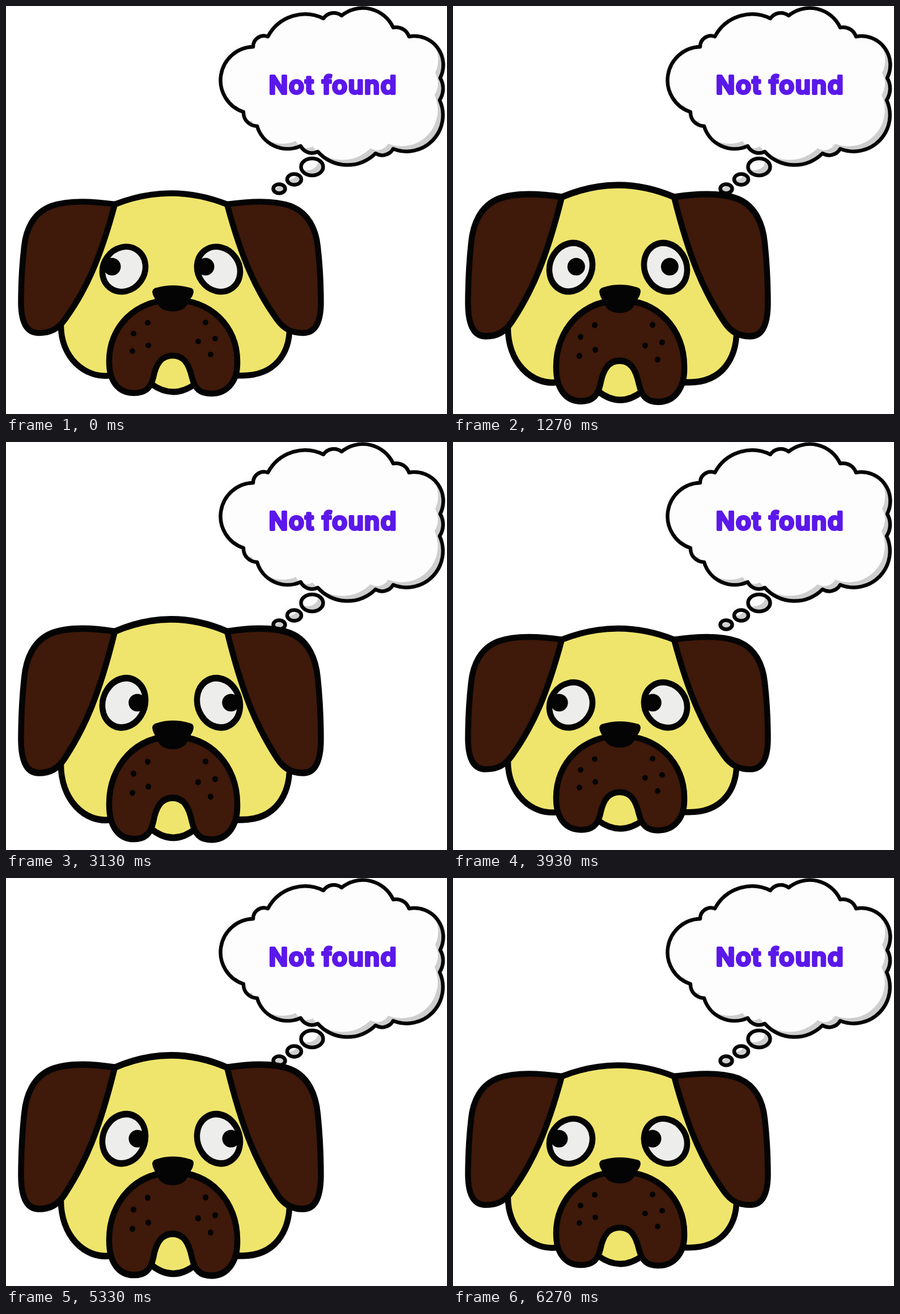
These frames come from a looping animation (778x720 px, 6.46 s). An HTML page:

```html
<!DOCTYPE html>
<html lang="en">
<head>
<meta charset="utf-8">
<title>Not found</title>
<style>
  html, body { margin: 0; width: 100%; height: 100%; overflow: hidden; background: #fff; }
  svg { display: block; width: 778px; height: 720px; }
  text { font: 600 44px Inter, "Open Sans", sans-serif; letter-spacing: 1.7px; fill: #5b18ea; stroke: #5b18ea; stroke-width: 4; stroke-linejoin: round; }
  .line { stroke: #040404; stroke-width: 10.5; stroke-linejoin: round; }
  .thin { stroke: #040404; stroke-width: 6.5; stroke-linejoin: round; fill: none; }
  .yellow { fill: #efe56c; }
  .brown { fill: #3f190a; }
  .white { fill: #ededec; }
</style>
</head>
<body>
<svg viewBox="0 0 778 720">
  <defs>
    <g id="bubble">
      <path d="M436 72A19 19 0 0 1 462 54A74 74 0 0 1 560 22A22 22 0 0 1 592 17A59 59 0 0 1 683 38A24 24 0 0 1 711 54
        A51 51 0 0 1 766 127A37 37 0 0 1 765 166A64 64 0 0 1 683 252A22 22 0 0 1 652 260A70 70 0 0 1 550 257
        A22 22 0 0 1 520 247A56 56 0 0 1 443 212A24 24 0 0 1 419 187A59 59 0 0 1 436 72Z"/>
      <ellipse cx="540" cy="284" rx="19.5" ry="15"/>
      <ellipse cx="508.5" cy="306" rx="12.5" ry="9.5"/>
      <ellipse cx="482" cy="322.5" rx="10.5" ry="8"/>
    </g>
    <path id="ear" class="brown line" d="M192 350C150 344 108 343 80 353C48 365 35 395 32 425C28 460 26.500 500 26.500 525
      C27 560 37 577 58 577C78 577 92 570 104 553C140 503 165 450 192 350Z"/>
  </defs>

  <use href="#bubble" fill="#cecece"/>
  <use href="#bubble" x="-9" y="-9" fill="#fdfdfd"/>
  <use href="#bubble" class="thin"/>
  <text x="577" y="155" text-anchor="middle">Not found</text>

  <g id="head">
    <path class="yellow line" d="M192 350Q291 311 390 350L500 560C503 612 475 655 410 652L335 666Q295 696 255 666L184 652C140 658 95 620 97 560Z"/>
    <use href="#ear"/>
    <use href="#ear" transform="matrix(-1 0 0 1 582 0)"/>
    <path class="brown line" d="M295 519C231 517 181 565 182 628C182 662 198 683 226 683C244 683 255 676 260 655
      C265 630 275 617 294 617C313 617 322 630 328 655C333 676 343 684 362 684C392 684 409 660 408 628C409 565 359 517 295 519Z"/>
    <path fill="#040404" d="M258 504Q259 498 266 497Q294 489 324 497Q331 498 331 504C330 514 323 518 321 524
      C315 544 273 544 267 524C265 518 259 514 258 504Z"/>
    <ellipse class="white line" rx="36.5" ry="41" transform="translate(208 464.5) rotate(35)"/>
    <ellipse class="white line" rx="36.5" ry="41" transform="translate(375 464.5) rotate(-35)"/>
    <path fill="none" stroke="#040404" stroke-width="10" stroke-linecap="round"
      d="M250 559h0M225 578h0M223 609h0M251 599h0M352 558.500h0M369 587h0M339 592h0M361 615h0"/>
  </g>
  <g id="pupils" fill="#040404">
    <circle cx="187" cy="460" r="15.5"/>
    <circle cx="352" cy="460" r="15.5"/>
  </g>
</svg>
<script>
  const PERIOD = 6460 / 3, START = 70, END = 1950;
  const PIVOT = 507, STRETCH = 0.1, LOOK = 45;
  const head = document.getElementById("head");
  const pupils = document.getElementById("pupils");
  const origin = performance.now();

  function draw() {
    const time = (performance.now() - origin) % PERIOD;
    const progress = Math.min(1, Math.max(0, (time - START) / (END - START)));
    const swell = (1 - Math.cos(2 * Math.PI * progress)) / 2;
    const scale = 1 + STRETCH * swell;
    head.setAttribute("transform", `matrix(1 0 0 ${scale} 0 ${PIVOT * (1 - scale)})`);
    pupils.setAttribute("transform", `translate(${LOOK * swell * swell} 0)`);
    requestAnimationFrame(draw);
  }
  draw();
</script>
</body>
</html>
```
